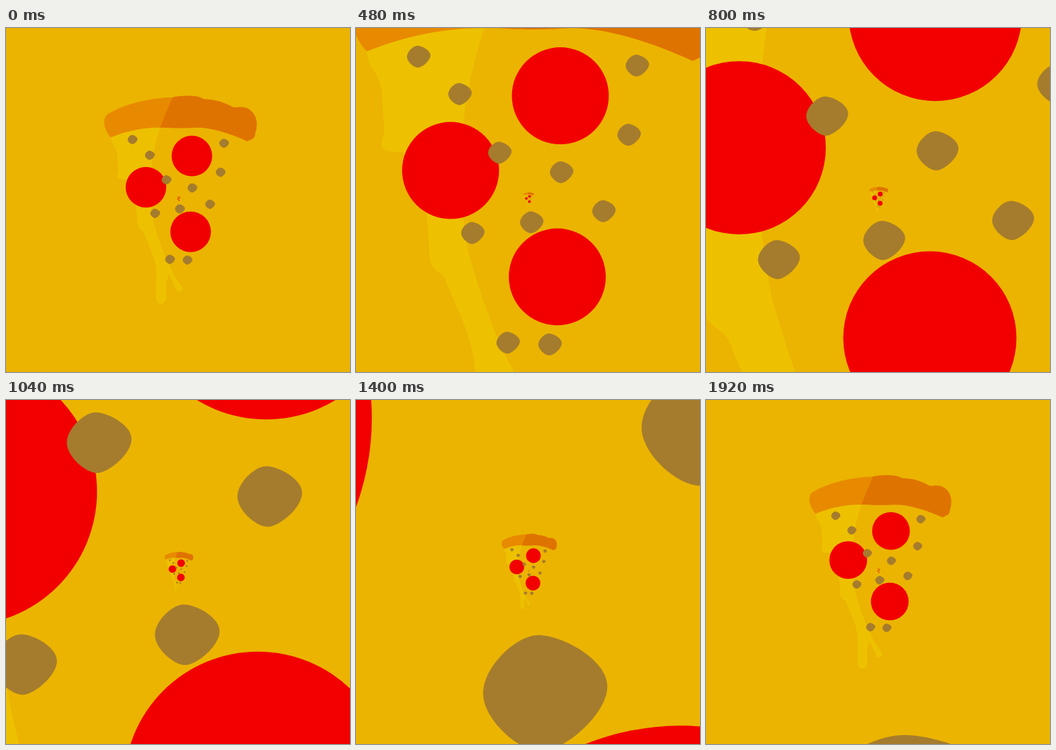
These frames come from a looping animation (500 px wide and 500 px high, 1.96 s). An HTML page:

```html
<!DOCTYPE html>
<html lang="en">
<head>
<meta charset="utf-8">
<title>Endless pizza</title>
<style>
  html, body { margin: 0; width: 100%; height: 100%; overflow: hidden; background: #ebb400; }
  svg { display: block; width: 100%; height: 100%; }
</style>
</head>
<body>
<svg id="stage" viewBox="0 0 500 500">
  <defs>
    <path id="mushroom" fill="#a57c2d" transform="scale(.271)"
      d="M-47 0C-47 -20 -22 -44 -5 -44C12 -44 47 -26 47 -5C47 16 14 44 -3 44C-20 44 -47 20 -47 0Z"/>
    <circle id="pepperoni" r="52.75" fill="#f20000"/>
    <g id="slice">
      <!-- melted cheese with two drips -->
      <path fill="#edc100" d="M74 86C78 112 92 112 92 142S97 168 92 182S96 198 114 197L139 262
        C144 290 141 312 146 321S156 326 161 338C171 365 192 400 193 440L192 502
        C192 527 219 527 219 501S216 465 226 444L245 484C250 497 264 486 260 478
        C217 415 200 355 187.5 315C174 260 169 160 203 62L190 45L90 70Z"/>
      <!-- crust: lit side, then shaded side -->
      <path fill="#e88a00" d="M75 88C62 76 48 41 66 28C108 2 175 -15 240 -16L212 63C165 61 120 70 75 88Z"/>
      <path fill="#df7300" d="M235 -16C255 -21 300 -22 311 -14C318 -8 346 -16 388 7C396 12 402 9 412 9
        C445 9 463 42 450 78C449 91 445 91 429.5 98.5C380 76 330 61 292 63S240 64 203 62Q216 28 235 -16Z"/>
    </g>
  </defs>
</svg>
<script>
const LOOP = 1960, STEP = 40;
const RATIO = 35;            // size of one slice relative to the slice nested in it
const BASE = 1 / 1.788;      // size at the start of the loop
const CX = 250.9, CY = 249;  // zoom centre

const stage = document.getElementById('stage');
const slice = document.getElementById('slice');

function add(parent, tag, attrs) {
  const el = document.createElementNS('http://www.w3.org/2000/svg', tag);
  for (const name in attrs) el.setAttribute(name, attrs[name]);
  return parent.appendChild(el);
}

function scatter(id, places) {
  for (const [x, y] of places) add(slice, 'use', { href: '#' + id, x, y });
}

scatter('pepperoni', [[285.4, 136.4], [166, 217.6], [282.1, 333.4]]);
scatter('mushroom', [
  [131.3, 93.8], [176.2, 134.5], [369.2, 103.5], [360.2, 178.8],
  [219.6, 198.3], [286.8, 219.5], [332.8, 261.9], [254.3, 274],
  [190.2, 285.7], [228.6, 405], [274.2, 406.9]
]);

// Largest first, each next one nested deeper.
const layers = [0, 1, 2].map(() => add(stage, 'use', { href: '#slice' }));

function draw(now) {
  const t = Math.floor((now % LOOP) / STEP) * STEP;
  layers.forEach((layer, depth) => {
    const size = BASE * RATIO ** (t / LOOP - depth);
    layer.setAttribute('transform', `translate(${CX} ${CY}) scale(${size}) translate(${-CX} ${-CY})`);
  });
}

const start = performance.now();
function tick() {
  draw(performance.now() - start);
  requestAnimationFrame(tick);
}
tick();
</script>
</body>
</html>
```
